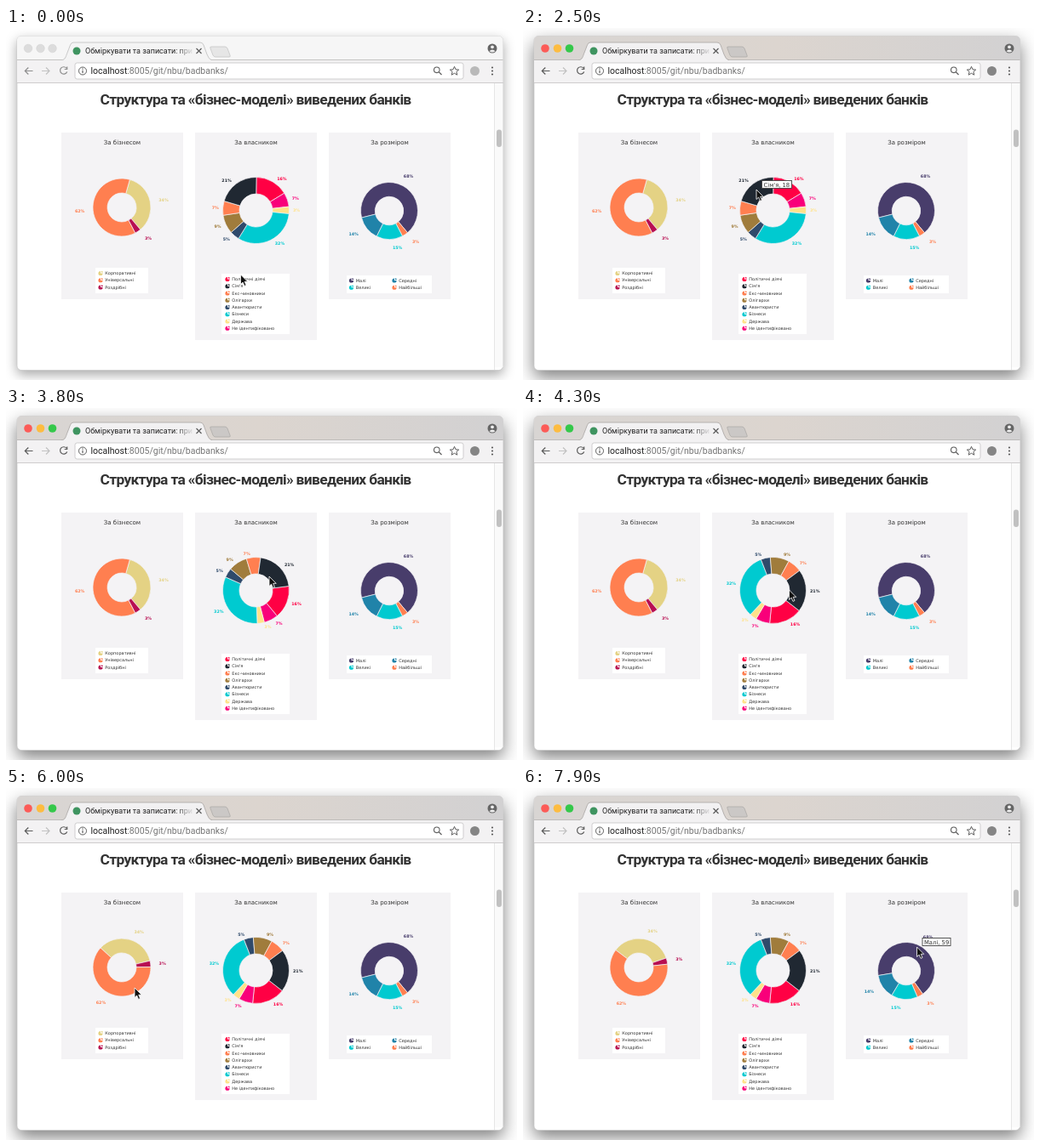
An HTML page that plays this animation: 600x414 px, repeating every 8000 ms.

```html
<!DOCTYPE html>
<html lang="uk">
<head>
<meta charset="utf-8">
<title>Структура банків</title>
<style>
  html, body { margin: 0; width: 100%; height: 100%; overflow: hidden; background: #fff; }
  svg { display: block; width: 600px; height: 414px; }
  .frame { fill: #fff; stroke: #c4c4c4; stroke-width: .7; filter: drop-shadow(0 5px 7px rgba(0, 0, 0, .34)); }
  .bar { fill: #f6f6f6; }
  .tab { fill: #f4f4f4; stroke: #bdbdbd; stroke-width: .8; }
  .plus { fill: #e6e6e6; stroke: #c0c0c0; stroke-width: .7; }
  .light { fill: #dcdcdc; stroke: #d0d0d0; stroke-width: .5; }
  .ext { fill: #b9b9b9; }
  .icon { fill: none; stroke: #5c5c5c; stroke-width: 1.2; }
  .nav { stroke: #8e8e8e; fill: none; stroke-width: 1.2; }
  .active .frame { filter: drop-shadow(0 8px 10px rgba(0, 0, 0, .5)); }
  .active .bar { fill: url(#barFill); }
  .active .tab { fill: #f2f1f2; stroke: #a9a5a3; }
  .active .plus { fill: #cbc8c6; stroke: #aaa6a4; }
  .active .light { fill: var(--on); stroke: none; }
  .active .ext { fill: #858585; }
  .active .nav { stroke: #5c5c5c; }
  .nav.off, .active .nav.off { stroke: #c2c2c2; }
  .ui { font-family: Roboto, sans-serif; }
  .small { font-family: "DejaVu Sans", Verdana, sans-serif; fill: #333; }
  .card { fill: #f4f3f5; }
  .cap { font-size: 7px; text-anchor: middle; }
  .item { font-size: 5px; }
  .pct { font-size: 4.8px; font-weight: 700; }
  .slice { stroke: #f4f3f5; stroke-width: .7; }
</style>
</head>
<body>
<svg id="stage" viewBox="0 0 600 414">
  <defs>
    <linearGradient id="barFill">
      <stop offset="0" stop-color="#d8d5d3"/>
      <stop offset=".5" stop-color="#dcd5cf"/>
      <stop offset="1" stop-color="#d2d1d2"/>
    </linearGradient>
    <linearGradient id="fade" gradientUnits="userSpaceOnUse" x1="198" y1="0" x2="221" y2="0">
      <stop offset="0" stop-color="#222"/>
      <stop offset="1" stop-color="#222" stop-opacity="0"/>
    </linearGradient>
  </defs>

  <rect class="frame" x="13" y="9.500" width="570.500" height="393" rx="5"/>
  <path class="bar" d="M13 38V14.500a5 5 0 0 1 5-5H578.500a5 5 0 0 1 5 5V38Z"/>
  <path d="M13 37.500H583.500" stroke="#b8b6b5" stroke-width=".8"/>
  <path class="tab" d="M65 38C70 37 70 34 72 29L75.500 20Q76.500 17 79 17H228Q231 17 232 20L236 31Q238 37 242 38"/>
  <rect x="13" y="38" width="570.500" height="26" fill="#f3f2f3"/>
  <path d="M13 64.500H583.500" stroke="#c9c7c8" stroke-width=".9"/>
  <path class="plus" d="M241 22H257Q259 22 260 24L263 32Q264 34 262 34H246Q244 34 243 32L240 24Q239 22 241 22Z"/>
  <circle class="light" cx="26" cy="24" r="4.800" style="--on:#fc5b57"/>
  <circle class="light" cx="40.500" cy="24" r="4.800" style="--on:#fdbc40"/>
  <circle class="light" cx="54.500" cy="24" r="4.800" style="--on:#34c84a"/>
  <circle cx="83" cy="27" r="4.500" fill="#3f9460"/>
  <text class="ui" x="93" y="30" font-size="9" fill="url(#fade)">Обміркувати та записати: при</text>
  <path d="M223.500 24L229.500 30M229.500 24L223.500 30" class="icon"/>

  <circle cx="571" cy="24" r="5.500" fill="#666"/>
  <circle cx="571" cy="22.300" r="1.900" fill="#eee"/>
  <path d="M567.500 27.200Q571 23.600 574.500 27.200Q571 29.600 567.500 27.200Z" fill="#eee"/>

  <path class="nav" d="M31.500 50.500H22.500M26.300 46.500L22.300 50.500L26.300 54.500"/>
  <path class="nav off" d="M42 50.500H51M47 46.500L51 50.500L47 54.500"/>
  <path class="nav" d="M71 47.200A4.200 4.200 0 1 0 71.700 51.500M71.700 45.500V48.500H68.700"/>
  <rect x="81" y="41" width="456" height="19" rx="2.500" fill="#fff" stroke="#c3c2c3" stroke-width=".8"/>
  <circle class="icon" cx="90" cy="50.500" r="4.500" style="stroke-width:1"/>
  <path class="icon" d="M90 49.700V53M90 47.600V48.700"/>
  <text class="ui" x="99.400" y="54" font-size="10.500" fill="#757575"><tspan fill="#222">localhost</tspan>:8005/git/nbu/badbanks/</text>
  <circle class="icon" cx="505.800" cy="49.300" r="3.300" style="stroke-width:1.100"/>
  <path class="icon" d="M508.200 51.700L511.500 55"/>
  <path class="icon" style="stroke-width:1" d="M526.500 45.300L528 48.800L531.700 49.100L528.900 51.500L529.800 55.200L526.500 53.200L523.200 55.200L524.100 51.500L521.300 49.100L525 48.800Z"/>
  <circle class="ext" cx="550.500" cy="50.500" r="5.500"/>
  <g fill="#5c5c5c"><circle cx="571" cy="46.500" r="1.100"/><circle cx="571" cy="50.500" r="1.100"/><circle cx="571" cy="54.500" r="1.100"/></g>

  <path d="M573.500 65V402" stroke="#e6e6e6"/>
  <rect x="574" y="65" width="9.500" height="334" fill="#fafafa"/>
  <rect x="576" y="119.500" width="6" height="20.500" rx="3" fill="#c1c1c1"/>

  <text class="ui" x="293" y="90.300" font-size="17.400" font-weight="700" letter-spacing="-.67" text-anchor="middle" fill="#333">Структура та «бізнес-моделі» виведених банків</text>

  <g id="charts"></g>
  <g id="tip">
    <rect x=".5" y=".5" height="9" fill="#fff" stroke="#444" stroke-width=".9"/>
    <text class="small" x="2.500" y="7.500" font-size="6.800"></text>
  </g>
  <path id="cursor" d="M0 0V11.500L2.600 9.100L4.500 13.400L6.500 12.500L4.700 8.300H8.200Z" fill="#111" stroke="#fff" stroke-width=".8"/>
</svg>

<script>
const LOOP = 8000, TOTAL = 87, LABEL_R = 43.5, FOCUS_AT = 2000;
const stage = document.getElementById('stage');
const cursorEl = document.getElementById('cursor');
const tipEl = document.getElementById('tip');

const YELLOW = '#e4d284', CRIMSON = '#b80f52', ORANGE = '#ff7f50', RED = '#ff0044',
  PINK = '#f9007a', CREAM = '#ffe28a', CYAN = '#00cad0', NAVY = '#2f4a6b',
  BROWN = '#a07c3c', BLACK = '#202832', PURPLE = '#483d6b', BLUE = '#2083a9';

// parts: [banks, colour] clockwise from `start`; legend: [text, colour]
const charts = [
  { title: 'За бізнесом', x: 136, y: 211, R: 34, start: 16,
    card: [65, 196], box: [105, 282, 62, 30], at: [111, 288.5], rows: 3, drag: [5400, 6100],
    parts: [[30, YELLOW], [3, CRIMSON], [54, ORANGE]],
    legend: [['Корпоративні', YELLOW], ['Універсальні', ORANGE], ['Роздрібні', CRIMSON]] },
  { title: 'За власником', x: 293.5, y: 214.5, R: 39, start: .8,
    card: [222, 244], box: [253, 289, 80, 71], at: [260, 295.5], rows: 8, drag: [2700, 4300],
    parts: [[14, RED], [6, PINK], [3, CREAM], [28, CYAN], [4, NAVY], [8, BROWN], [6, ORANGE], [18, BLACK]],
    legend: [['Політичні діячі', RED], ["Сім'я", BLACK], ['Екс-чиновники', ORANGE], ['Олігархи', BROWN],
      ['Авантюристи', NAVY], ['Бізнеси', CYAN], ['Держава', CREAM], ['Не ідентифіковано', PINK]] },
  { title: 'За розміром', x: 450, y: 215, R: 33.5, start: 256,
    card: [379, 196], box: [400, 291, 100, 21], at: [405.5, 297], rows: 2, drag: [7700, 7900],
    parts: [[59, PURPLE], [3, ORANGE], [13, CYAN], [12, BLUE]],
    legend: [['Малі', PURPLE], ['Великі', CYAN], ['Середні', BLUE], ['Найбільші', ORANGE]] }
];

// Pointer path: time, x, y
const path = [
  [0, 275.5, 290], [200, 276, 287], [900, 282, 236], [1500, 280, 197], [1800, 279, 194],
  [2500, 274, 190], [2700, 274, 190], [3000, 281, 188], [3400, 297, 187], [3800, 309, 198],
  [4100, 313, 208], [4300, 312.5, 214], [4500, 312, 215], [4700, 295, 222], [5000, 200, 234],
  [5300, 122, 234], [5400, 122, 234], [5700, 136, 238], [6000, 151, 235], [6100, 153, 233],
  [6300, 498, 225], [6600, 514, 214], [7000, 480, 195], [7300, 460, 187], [7700, 460, 187],
  [7900, 462.5, 187], [8000, 463, 187]
];
const tips = [
  { from: 2100, to: 2700, text: "Сім'я, 18", width: 35 },
  { from: 7350, to: 8000, text: 'Малі, 59', width: 33 }
];

function add(parent, tag, attrs, text) {
  const el = document.createElementNS('http://www.w3.org/2000/svg', tag);
  set(el, attrs);
  if (text) el.textContent = text;
  return parent.appendChild(el);
}
function set(el, attrs) {
  for (const key in attrs) el.setAttribute(key, attrs[key]);
}

// Angles are degrees clockwise from the top.
const sin = a => Math.sin(a * Math.PI / 180);
const cos = a => Math.cos(a * Math.PI / 180);
const point = (c, r, a) => `${(c.x + r * sin(a)).toFixed(2)} ${(c.y - r * cos(a)).toFixed(2)}`;

function ring(c, a, b) {
  const big = b - a > 180 ? 1 : 0, r = c.R / 2;
  return `M${point(c, c.R, a)}A${c.R} ${c.R} 0 ${big} 1 ${point(c, c.R, b)}` +
    `L${point(c, r, b)}A${r} ${r} 0 ${big} 0 ${point(c, r, a)}Z`;
}

function pointer(t) {
  const i = Math.max(1, path.findIndex(p => p[0] >= t));
  const [t0, x0, y0] = path[i - 1], [t1, x1, y1] = path[i];
  const k = (t - t0) / (t1 - t0);
  return { x: x0 + (x1 - x0) * k, y: y0 + (y1 - y0) * k };
}

function bearing(c, t) {
  const p = pointer(t);
  return Math.atan2(p.x - c.x, c.y - p.y) * 180 / Math.PI;
}

// A dragged ring turns by the same angle as the pointer.
function turn(c, t) {
  const [from, to] = c.drag;
  const now = Math.min(Math.max(t, from), to);
  return (bearing(c, now) - bearing(c, from) + 540) % 360 - 180;
}

function build(c) {
  const g = add(document.getElementById('charts'), 'g', {});
  const [cx, height] = c.card, [bx, by, bw, bh] = c.box;
  add(g, 'rect', { class: 'card', x: cx, y: 123, width: 143, height });
  add(g, 'text', { class: 'small cap', x: cx + 71.5, y: 137 }, c.title);
  add(g, 'rect', { x: bx, y: by, width: bw, height: bh, fill: '#fff' });
  c.legend.forEach(([text, fill], i) => {
    const x = c.at[0] + Math.floor(i / c.rows) * 50.5;
    const y = c.at[1] + i % c.rows * 8.25;
    add(g, 'path', { d: `M${x} ${y}V${y - 2.6}A2.6 2.6 0 1 0 ${x + 2.6} ${y}Z`, fill });
    add(g, 'path', { d: `M${x + .9} ${y - .9}v-1.9a1.9 1.9 0 0 1 1.9 1.9Z`, fill });
    add(g, 'text', { class: 'small item', x: x + 5.3, y: y + 1.7 }, text);
  });
  c.slices = c.parts.map(([, fill]) => add(g, 'path', { class: 'slice', fill }));
  c.labels = c.parts.map(([n, fill]) =>
    add(g, 'text', { class: 'small pct', style: `fill:${fill}` }, Math.round(n / TOTAL * 100) + '%'));
}

function drawChart(c, t) {
  let a = c.start + turn(c, t);
  c.parts.forEach(([n], i) => {
    const b = a + n / TOTAL * 360, mid = (a + b) / 2;
    const side = sin(mid) < 0 ? -1 : 1;
    set(c.slices[i], { d: ring(c, a, b) });
    set(c.labels[i], {
      x: c.x + LABEL_R * sin(mid) + side * 3.5 * Math.abs(cos(mid)),
      y: c.y - LABEL_R * cos(mid) + 1.9,
      'text-anchor': side < 0 ? 'end' : 'start'
    });
    a = b;
  });
}

function draw() {
  const t = performance.now() % LOOP;
  const p = pointer(t);
  const tip = tips.find(s => t >= s.from && t < s.to);
  stage.classList.toggle('active', t >= FOCUS_AT);
  charts.forEach(c => drawChart(c, t));
  set(cursorEl, { transform: `translate(${p.x} ${p.y})` });
  tipEl.style.display = tip ? '' : 'none';
  if (tip) {
    set(tipEl, { transform: `translate(${p.x + 6} ${p.y - 11})` });
    set(tipEl.firstElementChild, { width: tip.width });
    tipEl.lastElementChild.textContent = tip.text;
  }
  requestAnimationFrame(draw);
}

charts.forEach(build);
draw();
</script>
</body>
</html>
```
